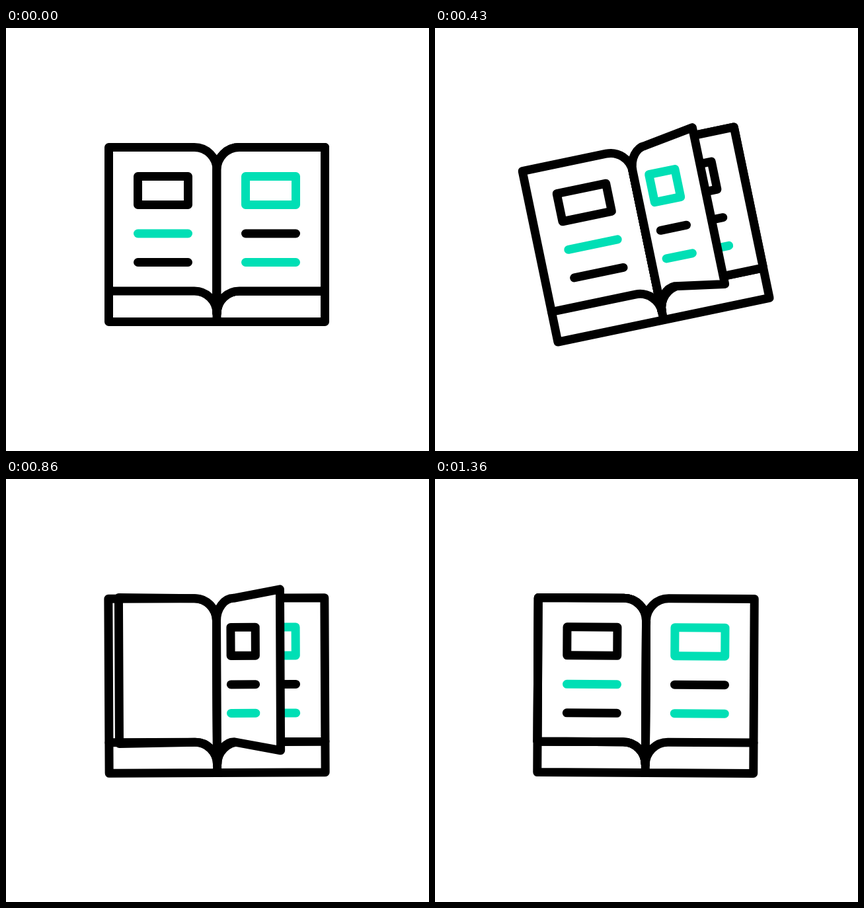
An HTML page with a canvas that plays this animation: 640x640 px, repeating every 2.43 s.

```html
<!DOCTYPE html>
<html lang="en">
<head>
<meta charset="utf-8">
<title>Book</title>
<style>
  html, body { margin: 0; width: 100%; height: 100%; overflow: hidden; background: #fff; }
  canvas { display: block; width: 640px; height: 640px; }
</style>
</head>
<body>
<canvas id="stage" width="640" height="640"></canvas>
<script>
const ctx = document.getElementById('stage').getContext('2d');
const LOOP = 2430, LAST_STEP = 19;
const INK = '#000', MINT = '#00dfb5';
const CX = 319, CY = 312, HALF = 163.5;
const TOP = 180.5, FOLD = 398, BASE = 444.5, ROUND = 34;
const LEAD = 23;

// [time, degrees], eased between neighbours
const SWAY = [[0, 0], [305, -12], [414, -12], [608, 6.1], [950, -1.6], [1215, 1.25], [1430, 0]];

// colours: picture box, first line, second line
const LEFT = [INK, MINT, INK];
const RIGHT = [MINT, INK, MINT];
const SHEETS = [
  { delay: 0, front: RIGHT, back: null },
  { delay: 420, front: [INK, INK, MINT], back: LEFT }
];

const clamp = (v, a, b) => Math.min(b, Math.max(a, v));

function sway(t) {
  for (let i = 1; i < SWAY.length; i++) {
    const [t0, a] = SWAY[i - 1], [t1, b] = SWAY[i];
    if (t <= t1) return a + (b - a) * (1 - Math.cos(Math.PI * (t - t0) / (t1 - t0))) / 2;
  }
  return 0;
}

// 1 = lying on the right, 0 = upright, -1 = lying on the left
function turn(t) {
  const u = t - 562;
  const s = -Math.sin(Math.PI / 2 * clamp(u / (u < 0 ? 312 : 410), -1, 1));
  return s < -0.985 ? -1 : s;
}

function lift(s) {
  return 22 * Math.pow(Math.max(0, 1 - s * s), 1.2) * (0.6 + 0.4 * clamp(s / 0.25, 0, 1));
}

function pagePath(s) {
  const edge = CX + HALF * s, up = lift(s);
  const r = ROUND * Math.sign(s) * Math.sqrt(Math.abs(s));
  const rx = Math.abs(r) < Math.abs(edge - CX) ? r : (edge - CX) * 0.9;
  ctx.beginPath();
  ctx.moveTo(CX, TOP + ROUND);
  ctx.bezierCurveTo(CX, TOP + ROUND * 0.45, CX + rx * 0.45, TOP, CX + rx, TOP);
  ctx.lineTo(edge, TOP - up);
  ctx.lineTo(edge, FOLD + up);
  ctx.lineTo(CX + rx, FOLD);
  ctx.bezierCurveTo(CX + rx * 0.45, FOLD, CX, FOLD + ROUND * 0.45, CX, FOLD + ROUND);
  ctx.closePath();
}

function content(colors, s) {
  const a = CX + 43.5 * s, b = CX + 119.5 * s;
  ctx.strokeStyle = colors[0];
  ctx.strokeRect(Math.min(a, b), 224.5, Math.abs(b - a), 43);
  [311, 354.5].forEach((y, i) => {
    ctx.strokeStyle = colors[i + 1];
    ctx.beginPath();
    ctx.moveTo(a, y);
    ctx.lineTo(b, y);
    ctx.stroke();
  });
  ctx.strokeStyle = INK;
}

function sheet({ s, inner, front, back }) {
  const colors = s > 0 ? front : back;
  pagePath(s);
  ctx.fillStyle = '#fff';
  ctx.fill();
  if (colors && inner * s > 0 && Math.abs(inner) > 0.15) {
    ctx.save();
    ctx.clip();
    content(colors, inner);
    ctx.restore();
  }
  pagePath(s);
  ctx.stroke();
}

function cover() {
  for (const side of [-1, 1]) {
    pagePath(side);
    ctx.stroke();
  }
  ctx.beginPath();
  ctx.moveTo(CX - HALF, FOLD);
  ctx.lineTo(CX - HALF, BASE);
  ctx.lineTo(CX + HALF, BASE);
  ctx.lineTo(CX + HALF, FOLD);
  ctx.moveTo(CX, FOLD);
  ctx.lineTo(CX, BASE);
  ctx.stroke();
}

function draw(t) {
  ctx.setTransform(1, 0, 0, 1, 0, 0);
  ctx.fillStyle = '#fff';
  ctx.fillRect(0, 0, 640, 640);
  ctx.translate(CX, CY);
  ctx.rotate(sway(t) * Math.PI / 180);
  ctx.translate(-CX, -CY);
  ctx.lineWidth = 13;
  ctx.lineCap = ctx.lineJoin = 'round';
  ctx.strokeStyle = INK;

  // what is printed on a sheet turns slightly ahead of its edge
  const sheets = SHEETS.map(p => ({ ...p, s: turn(t - p.delay), inner: turn(t - p.delay + LEAD) }));
  content(LEFT, -1);
  content(RIGHT, 1);
  sheets.filter(p => p.s <= 0).forEach(sheet);
  cover();
  sheets.filter(p => p.s > 0).reverse().forEach(sheet);
}

// the motion runs at 14 steps a second and rests on the last one
function stepTime(t) {
  let n = LAST_STEP;
  while (n && Math.round(n * 50 / 7) * 10 > t) n--;
  return n * 500 / 7;
}

const start = performance.now();
function tick() {
  draw(stepTime((performance.now() - start) % LOOP));
  requestAnimationFrame(tick);
}
tick();
</script>
</body>
</html>
```
